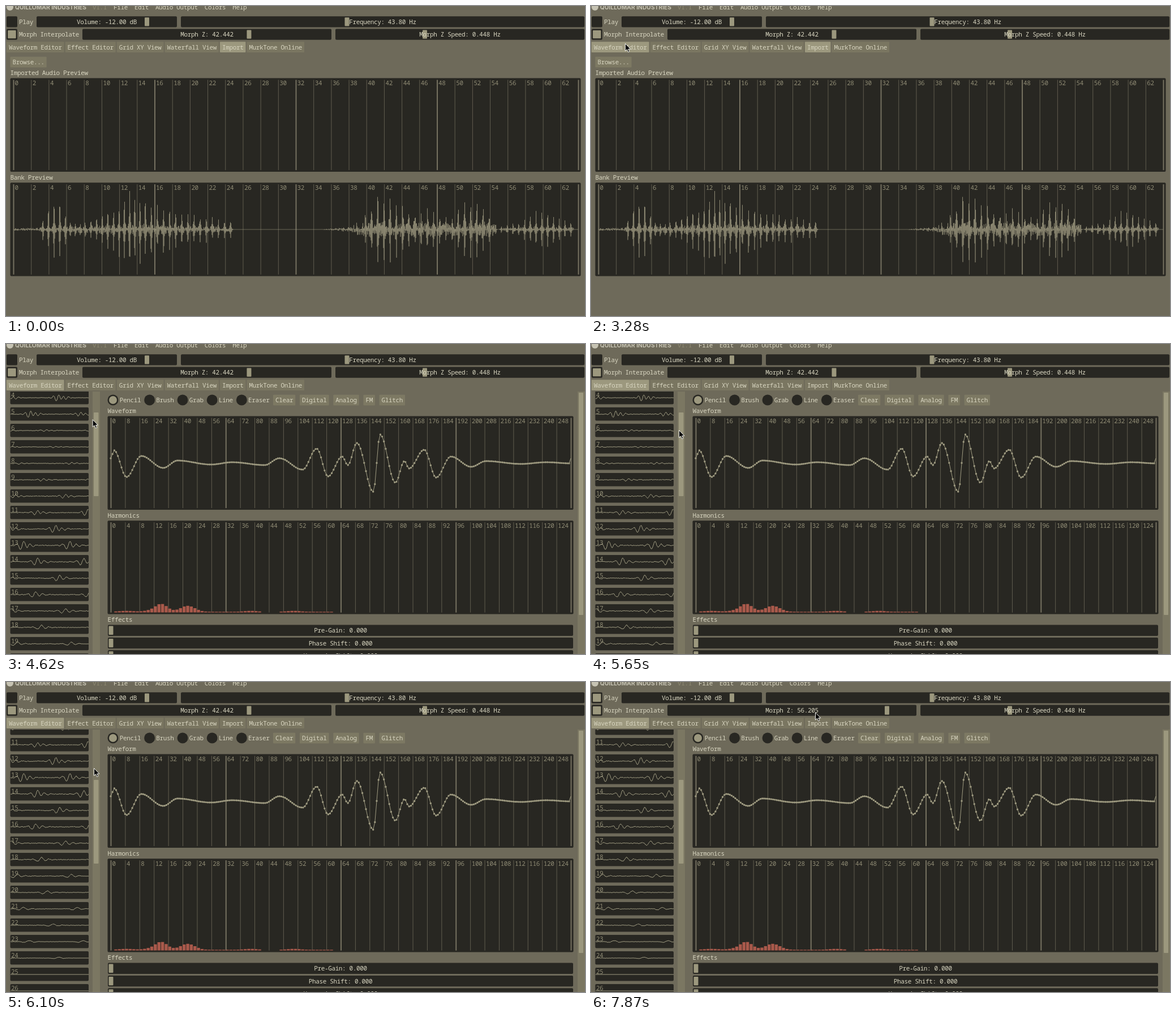
Recreate the animation shown at these times as an HTML page. Size 1023 px wide and 548 px high, loop 8 s.

```html
<!DOCTYPE html>
<html lang="en">
<head>
<meta charset="utf-8">
<title>Wavetable editor</title>
<style>
  html, body { margin: 0; width: 100%; height: 100%; overflow: hidden; background: #6e6a5a; }
  svg { display: block; width: 1023px; height: 548px; }
  text { font: 300 11px "Noto Sans Mono", "Liberation Mono", monospace; letter-spacing: -0.36px; fill: #d8d5c0; white-space: pre; }
  .brand { font: 700 10.3px Inter, "Open Sans", sans-serif; letter-spacing: 0; fill: #c6c3b3; }
  .dim { fill: #8f8b74; }
  .dark { fill: #282722; }
  .button { fill: #7d7963; }
  .tab { fill: #7a7661; }
  .lit { fill: #9c987e; }
  .trough { fill: #7b7762; }
  .minor { fill: #605d4f; }
  .major { fill: #757160; }
  .bar { fill: #a9594b; }
  .wave { fill: none; stroke: #9f9b81; stroke-width: 1; stroke-linejoin: round; }
  .bank { stroke-width: 0.6; stroke-linejoin: bevel; }
  .dots { stroke-width: 3.4; stroke-linecap: round; }
  .cursor { fill: #000; stroke: #f4f4f0; stroke-width: 1; }
</style>
</head>
<body>
<svg id="stage" viewBox="0 0 1023 548"></svg>
<script>
const LOOP = 8000;
const FRAME = 148.7;  // the screen refreshes in held steps of this many ms
const CHAR = 6.24;    // advance of one letter
const stage = document.getElementById('stage');

function add(parent, tag, attrs) {
  const node = document.createElementNS('http://www.w3.org/2000/svg', tag);
  for (const key in attrs) node.setAttribute(key, attrs[key]);
  return parent.appendChild(node);
}
const group = (parent, attrs) => add(parent, 'g', attrs);
const box = (g, x, y, right, bottom, cls, rx = 2) =>
  add(g, 'rect', { x, y, width: right - x, height: bottom - y, rx, class: cls });
const path = (g, d, cls) => add(g, 'path', { d, class: cls });

// y is the vertical centre of the line of text
function label(g, x, y, str, cls = '', anchor = 'start') {
  const node = add(g, 'text', { x, y: y + 4, class: cls, 'text-anchor': anchor });
  node.textContent = str;
  return node;
}

// Places words side by side; draw(x, word) returns the right edge
function row(x, gap, words, draw) {
  for (const word of words) x = draw(x, word) + gap;
}
function button(g, x, y, str, cls = 'button') {
  const right = x + str.length * CHAR + 8;
  const rect = box(g, x, y, right, y + 18.8, cls, 1);
  label(g, x + 4, y + 9.3, str);
  return { rect, right };
}
function slider(g, x, right, y, grabX, str) {
  box(g, x, y, right, y + 19.3, 'dark');
  const grab = box(g, grabX - 4, y + 2, grabX + 4, y + 17.3, 'lit', 1);
  const text = label(g, (x + right) / 2, y + 9.6, str, '', 'middle');
  return { grab, text };
}
function checkbox(g, y, str) {
  box(g, 1, y, 20, y + 19.3, 'dark');
  label(g, 23, y + 9.6, str);
  return box(g, 3.2, y + 2.6, 17.6, y + 16.8, 'lit', 1);
}
function gridPanel(g, title, x, right, y, step) {
  label(g, x - 0.5, y - 9.7, title);
  box(g, x - 0.5, y, right + 0.5, y + 165.3, 'dark');
  const x0 = x + 5, gap = (right - 4 - x0) / 32;
  for (let i = 0; i <= 32; i++) {
    const lx = x0 + i * gap, major = i % 8 === 0;
    box(g, lx - major / 2, y + 3, lx + 1 + major / 2, y + 162.5, major ? 'major' : 'minor', 0);
    if (i < 32) label(g, lx + 2.5, y + 8.8, String(i * step), 'dim');
  }
}

function seeded(seed) {
  return () => (seed = (seed * 16807) % 2147483647) / 2147483647;
}
const bell = (x, mid, width) => Math.exp(-(((x - mid) / width) ** 2));
const smooth = t => (1 - Math.cos(Math.PI * t)) / 2;

// Joins key points [x, y, x, y, ...]
function through(points, x, ease = t => t) {
  let i = 0;
  while (i < points.length - 4 && points[i + 2] <= x) i += 2;
  const [xa, ya, xb, yb] = points.slice(i, i + 4);
  return ya + (yb - ya) * ease(Math.min(1, Math.max(0, (x - xa) / (xb - xa))));
}

// ---- the sound: voice pulses under a loudness curve ----
const pulseAt = [0, 65, 4, 105, 8, 140, 14, 200, 19, 246, 33, 397, 40, 635, 61, 865, 74, 998];
const loudness = [45, 0, 65, 18, 84, 46, 95, 46, 115, 9, 140, 9, 190, 32, 218, 62, 257, 41, 325, 23,
  397, 12, 402, 0, 610, 0, 645, 30, 656, 58, 677, 50, 723, 19, 745, 32, 768, 18, 790, 19, 812, 48,
  833, 47, 868, 4, 905, 8, 941, 31, 960, 25, 1003, 7];
const hiss = [14, 2, 110, 5, 240, 9, 398, 4, 402, 0, 555, 0, 612, 5, 618, 13, 860, 12, 868, 0, 880, 3,
  940, 5, 1003, 3];
const pulses = Array.from({ length: 75 }, (_, i) => through(pulseAt, i));

function bankPath(mid) {
  const rand = seeded(77);
  let d = 'M13 ' + mid, side = 1;
  for (let x = 14; x < 1003; x += 0.5) {
    const dist = Math.min(...pulses.map(p => Math.abs(p - x)));
    const spike = through(loudness, x) * (0.72 * bell(dist, 0, 0.8) + 0.3 * bell(dist, 0, 2) * (0.4 + rand()));
    const size = spike + through(hiss, x) * rand() ** 1.5;
    d += `L${x} ${(mid + side * size).toFixed(1)}`;
    side = -side;
  }
  return d + `L1003 ${mid}H1011`;
}

// One short slice of the sound, 15.6 bank pixels long
function slicePath(n, mid) {
  const rand = seeded(n * 991 + 5), start = 13 + 15.6 * n;
  const pitch = 7 - 0.18 * n, phase = rand() * 2;
  let d = '';
  for (let px = 8; px <= 146; px++) {
    const x = start + (px - 8) * 15.6 / 138;
    let y = through(hiss, x) * 0.18 * (rand() - 0.5);
    for (const p of pulses) {
      const off = x - p;
      const tone = Math.cos(off * pitch) + 0.45 * Math.sin(off * pitch * 0.6 + phase);
      y += through(loudness, p) * 0.11 * bell(off, 0.2, 1.5) * tone;
    }
    d += `${d ? 'L' : 'M'}${px} ${(mid - y).toFixed(1)}`;
  }
  return d;
}

// ---- header ----
const header = group(stage);
add(header, 'circle', { cx: 7, cy: 2, r: 6, fill: '#c6c3b3' });
label(header, 16, 2, 'QUILLOMAR INDUSTRIES', 'brand');
row(153, 12, ['v1.1', 'File', 'Edit', 'Audio Output', 'Colors', 'Help'], (x, str) => {
  label(header, x, 2, str, str === 'v1.1' ? 'dim' : '');
  return x + str.length * CHAR;
});

const playMark = checkbox(header, 18.2, 'Play');
slider(header, 54, 302, 18.2, 249, 'Volume: -12.00 dB');
slider(header, 309, 1022, 18.2, 602.5, 'Frequency: 43.80 Hz');
checkbox(header, 40.5, 'Morph Interpolate');
const morph = slider(header, 135, 575, 40.5, 429.5, 'Morph Z: 42.442');
slider(header, 582, 1022, 40.5, 740, 'Morph Z Speed: 0.448 Hz');

const tabs = {};
row(1, 2, ['Waveform Editor', 'Effect Editor', 'Grid XY View', 'Waterfall View', 'Import', 'MurkTone Online'],
  (x, str) => {
    const { rect, right } = button(header, x, 63.2, str, 'tab');
    tabs[str] = rect;
    return right;
  });

// ---- import view ----
const importView = group(stage);
button(importView, 7.5, 89.7, 'Browse...');
gridPanel(importView, 'Imported Audio Preview', 8, 1015, 127.6, 2);
gridPanel(importView, 'Bank Preview', 8, 1015, 312.2, 2);
path(importView, bankPath(395), 'wave bank');

// ---- waveform editor view ----
const editView = group(stage);
row(189, 15.5, ['Pencil', 'Brush', 'Grab', 'Line', 'Eraser'], (cx, str) => {
  add(editView, 'circle', { cx, cy: 99, r: 9.5, class: 'dark' });
  if (str === 'Pencil') add(editView, 'circle', { cx, cy: 99, r: 7, class: 'lit' });
  label(editView, cx + 11.7, 99, str);
  return cx + 11.7 + str.length * CHAR;
});
row(472, 7.7, ['Clear', 'Digital', 'Analog', 'FM', 'Glitch'], (x, str) => button(editView, x, 89.7, str).right);
gridPanel(editView, 'Waveform', 180, 1002, 127.6, 8);
gridPanel(editView, 'Harmonics', 180, 1002, 312.2, 4);
label(editView, 179.5, 487, 'Effects');
['Pre-Gain', 'Phase Shift', 'Harmonic Shift'].forEach((str, i) =>
  slider(editView, 180, 1002, 496.6 + 22.3 * i, 185.5, str + ': 0.000'));

// Crests and troughs of the edited wave
const crests = [185, 202, 191, 188, 213, 235, 239, 198, 278, 219, 303, 206, 362, 213, 400, 209, 457, 214,
  483, 202, 524, 222, 549, 185, 569, 234, 594, 199, 604, 214, 620, 175, 649, 261, 661, 160, 688, 245,
  704, 207, 712, 220, 739, 187, 760, 236, 786, 199, 822, 217, 848, 207, 910, 212, 955, 209, 998, 211];
let line = '', dots = '';
for (let i = 0; i < 256; i++) {
  const x = 185 + i * 813 / 256;
  const at = `${x.toFixed(1)} ${through(crests, x, smooth).toFixed(1)}`;
  line += (i ? 'L' : 'M') + at;
  dots += `M${at}h0`;
}
path(editView, line + 'L998 202', 'wave');
path(editView, dots, 'wave dots');

for (let i = 1; i <= 61; i++) {
  const floor = i > 41 && i < 47 ? 0 : 1.2;
  const h = floor + 14 * bell(i, 13.6, 2.4) + 10.5 * bell(i, 21, 2.8)
    + 1.6 * (bell(i, 4, 3) + bell(i, 10, 2) + bell(i, 38.5, 2.5) + bell(i, 50.5, 2.5));
  const x = 185 + i * 6.35;
  if (h > 0.5) box(editView, x, 474.5 - h, x + 5.4, 474.5, 'bar', 0);
}

// ---- wave list ----
const clip = add(add(stage, 'defs'), 'clipPath', { id: 'listClip' });
add(clip, 'rect', { x: 0, y: 84, width: 153, height: 464 });
const list = group(group(editView, { 'clip-path': 'url(#listClip)' }));
for (let n = 4; n <= 26; n++) {
  const top = 83 + 29 * (n - 4);
  box(list, 7.5, top, 146, top + 23.5, 'dark');
  label(list, 9, top + 6.5, String(n), 'dim');
  path(list, slicePath(n, top + 12), 'wave');
}
box(editView, 153, 84, 166, 548, 'trough', 0);
const thumb = box(editView, 155, 121, 163.5, 269, 'lit', 1);
box(editView, 1010, 84, 1023, 548, 'trough', 0);
box(editView, 1012, 86, 1020, 479, 'lit', 1);

// ---- motion, counted in refresh steps ----
const cursor = path(stage, 'M0 0V13L3 10.3L5.2 15L7.4 14L5.3 9.7H9.4Z', 'cursor');
const moves = [
  { from: 0, to: 1, x: 413, y: 361 },
  { from: 1, to: 2, x: 395, y: 335 },
  { from: 3, to: 5, x: 74.5, y: 62.5 },
  { from: 6, to: 9, x: 55, y: 74 },
  { from: 18, to: 20, x: 72, y: 70 },
  { from: 20, to: 22, x: 60.5, y: 66.5 },
  { from: 27, to: 33, x: 184, y: 156 },
  { from: 33, to: 35, x: 131.5, y: 126.5 },
  { from: 35, to: 38, x: 155.5, y: 152.5 },
  { from: 42, to: 48, x: 13.5, y: 26.5 },
  { from: 50, to: 53, x: 396.5, y: 54 }
];
const HOVER = 11, OPEN = 25, SCROLL = 40, PLAY = 50;

function pointer(step) {
  let { x, y } = moves[0];
  for (const m of moves) {
    const part = smooth(Math.min(1, Math.max(0, (step - m.from) / (m.to - m.from))));
    x += (m.x - x) * part;
    y += (m.y - y) * part;
  }
  return `translate(${x} ${y})`;
}

const show = (node, on) => node.setAttribute('visibility', on ? 'visible' : 'hidden');
const light = (tab, on) => tab.setAttribute('class', on ? 'lit' : 'tab');

function render(t) {
  const step = Math.floor((t + 15) / FRAME);
  show(cursor, step > 0);
  cursor.setAttribute('transform', pointer(step));

  const editing = step >= OPEN;
  show(importView, !editing);
  show(editView, editing);
  light(tabs['Waveform Editor'], step >= HOVER);
  light(tabs.Import, !editing);

  const notches = Math.min(2, Math.max(0, step - SCROLL + 1));
  list.setAttribute('transform', `translate(0 ${-93.5 * notches})`);
  thumb.setAttribute('y', 121 + 26 * notches);

  const playing = step >= PLAY;
  const z = playing ? 56.205 - 4.2 * (PLAY + 3 - step) : 42.442;
  show(playMark, playing);
  morph.grab.setAttribute('x', 137.1 + 6.794 * z);
  morph.text.textContent = 'Morph Z: ' + z.toFixed(3);
}

let start;
function tick(now) {
  if (start === undefined) start = now;
  render((now - start) % LOOP);
  requestAnimationFrame(tick);
}
render(0);
requestAnimationFrame(tick);
</script>
</body>
</html>
```
